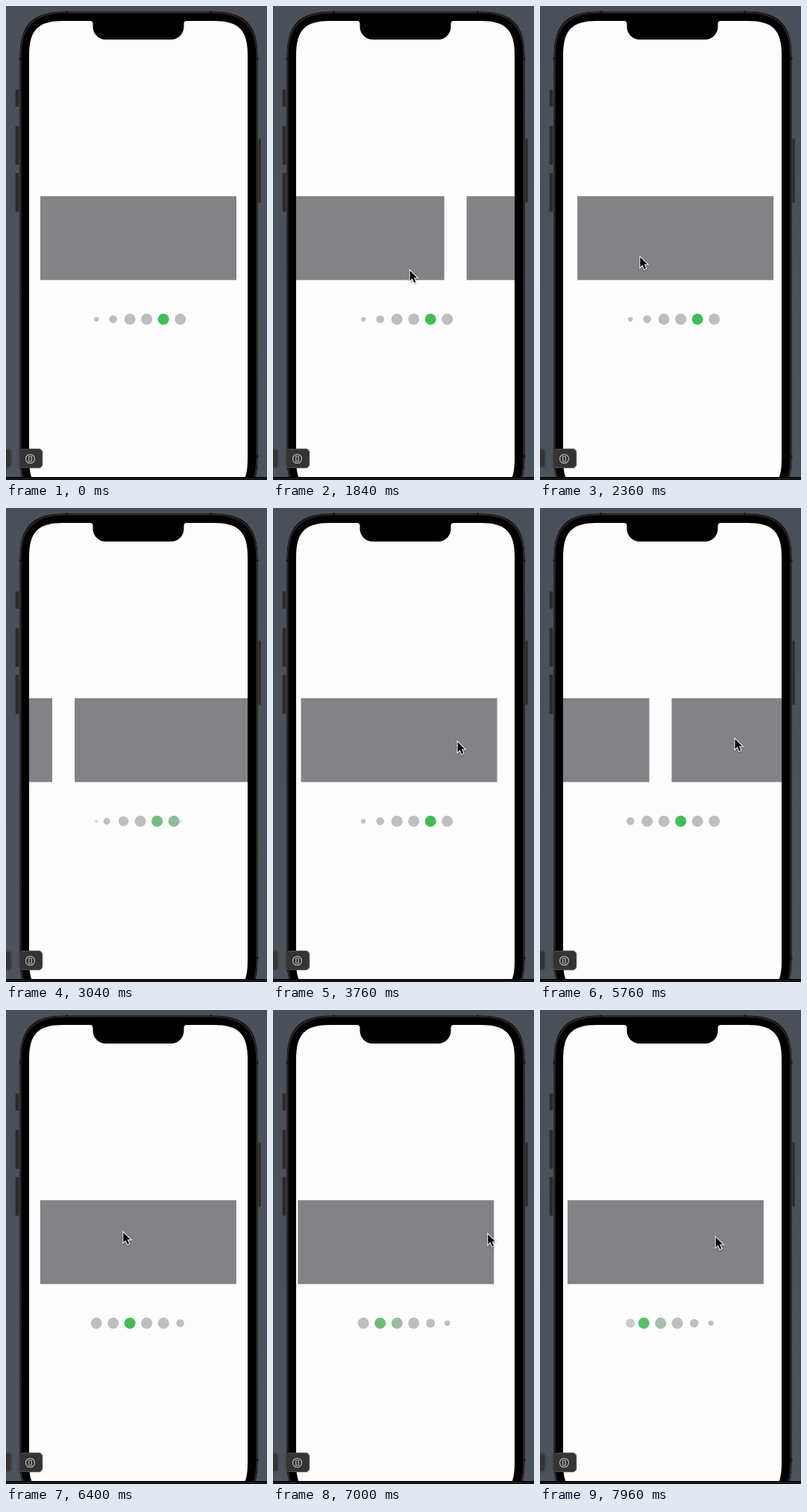
An HTML page for the animation above (8 s loop, 350 by 636 pixels).

```html
<!DOCTYPE html>
<html lang="en">
<head>
<meta charset="utf-8">
<title>Paging dots</title>
<style>
  html, body { margin: 0; width: 100%; height: 100%; overflow: hidden; background: #4b515a; }
  svg { display: block; width: 350px; height: 636px; }
</style>
</head>
<body>
<svg viewBox="0 0 350 636">
  <defs>
    <clipPath id="screen">
      <path d="M31 66C31 32 43 20 77 20H278C312 20 324 32 324 66V608C324 642 312 654 278 654H77C43 654 31 642 31 608Z"/>
    </clipPath>
    <linearGradient id="wall" x2="0" y2="1">
      <stop stop-color="#4a505a"/><stop offset="1" stop-color="#4d535c"/>
    </linearGradient>
  </defs>
  <rect width="350" height="636" fill="url(#wall)"/>

  <g fill="#29292b" stroke="#3b3c3f" stroke-width=".6">
    <rect x="12.8" y="112" width="5" height="23" rx="1"/>
    <rect x="12.8" y="161" width="5" height="52" rx="1"/>
    <rect x="12.8" y="224" width="5" height="52" rx="1"/>
    <rect x="337" y="178" width="4.6" height="86" rx="1"/>
  </g>
  <path d="M18 67C18 25 36 7 78 7H278C320 7 338 25 338 67V607C338 649 320 667 278 667H78C36 667 18 649 18 607Z" stroke="#50504f"/>
  <path d="M19.7 67C19.7 27 38 8.8 78 8.8H278C318 8.800 336.3 27 336.3 67V607C336.3 647 318 665 278 665H78C38 665 19.7 647 19.7 607Z" fill="none" stroke="#2a2a2a" stroke-width="1.8"/>
  <path d="M17.5 70.5h3M335.5 70.5h3M17.5 604h3M335.5 604h3M81.5 6.5v3M274.5 6.5v3" stroke="#161616" stroke-width="3"/>

  <g clip-path="url(#screen)">
    <rect x="31" y="20" width="293" height="616" fill="#fdfdfd"/>
    <g id="cards" fill="#838286"></g>
    <g id="dots"></g>
  </g>
  <path d="M112.500 19V20A4 4 0 0 1 116.500 24V28A17 17 0 0 0 133.500 45H221.500A17 17 0 0 0 238.500 28V24A4 4 0 0 1 242.500 20V19Z"/>

  <rect y="632" width="350" height="4" fill="#050505"/>
  <rect y="634" width="350" height=".8" fill="#303236"/>

  <g fill="#343434" stroke="#4e4f50" style="filter:drop-shadow(0 0 1px rgba(0,0,0,.4))">
    <rect x="-24" y="594.5" width="31" height="25" rx="4.5"/>
    <rect x="17.5" y="594.5" width="31" height="25" rx="4.5"/>
  </g>
  <g fill="none" stroke="#bdbdbd" stroke-width="1.1">
    <circle cx="32.5" cy="607.5" r="6"/>
    <rect x="30.7" y="604" width="3.6" height="7" rx=".8"/>
  </g>

  <path id="cursor" d="M1 2V15.600L4.100 12.600L6.600 18.200L8.800 17.200L6.400 11.600H10.600Z" stroke="#fff" stroke-width="2"
    style="paint-order:stroke;filter:drop-shadow(0 1px 1px rgba(0,0,0,.35))"/>
</svg>
<script>
const LOOP = 8000, PITCH = 293, PAGES = 10;
const DRAG = 250, FLING = 100, RETURN = 640, FADE = 350;
const SLOTS = 6, GAP = 22.5;
const GREY = [190, 190, 192], GREEN = [63, 191, 82];

const $ = id => document.getElementById(id);
const mix = (a, b, u) => a + (b - a) * u;
const clamp = (v, lo, hi) => Math.min(hi, Math.max(lo, v));
const smooth = u => u * u * (3 - 2 * u);
const easeOut = u => 1 - (1 - u) ** 2;

// The first entry is the resting state.
const swipes = [{ at: -100, dir: 1, x: 262, y: 424, page: 4, first: 0 }];

// at: release time, when the page is halfway; x, y: where the pointer grabs
function swipe(at, dir, x, y) {
  const last = swipes[swipes.length - 1], page = last.page + dir;
  // Keep one dot visible on each side of the current one
  const first = clamp(last.first, page - SLOTS + 2, page - 1);
  swipes.push({ at, dir, x, y, page, first });
}
swipe(1906, 1, 262, 353);
swipe(2893, 1, 250, 322);
swipe(3950, 1, 255, 312);
swipe(5030, -1, 158, 308);
swipe(5774, -1, 130, 308);
swipe(6780, -1, 150, 296);
swipe(7710, -1, 181, 304);
swipe(8500, -1, 146, 302);

function add(parent, tag, attrs) {
  const el = document.createElementNS('http://www.w3.org/2000/svg', tag);
  set(el, attrs);
  return parent.appendChild(el);
}
function set(el, attrs) {
  for (const k in attrs) el.setAttribute(k, attrs[k]);
}

for (let i = 0; i < PAGES; i++)
  add($('cards'), 'rect', { x: 46 + i * PITCH, y: 255.2, width: 263, height: 112.5 });
// Later dots go underneath earlier ones
const dots = [];
for (let i = PAGES - 1; i >= 0; i--) dots[i] = add($('dots'), 'circle', { cy: 420.3 });

const dragged = d => 0.5 * (1 + d / DRAG) ** 2;
const settled = (d, dir) => 1 - 0.5 * Math.exp(-d / (dir > 0 ? 127 : 90));

function scrollAt(t) {
  let pos = swipes[0].page;
  for (const { at, dir, page } of swipes.slice(1)) {
    const d = t - at;
    if (d > -DRAG) pos = page - dir + dir * (d < 0 ? dragged(d) : settled(d, dir));
  }
  return pos;
}

function dotState(i, { page, first }) {
  const slot = i - first, shown = slot >= 0 && slot < SLOTS;
  const far = clamp(Math.abs(i - page) - 2, 0, 2);
  return {
    x: 121.2 + GAP * clamp(slot, 0, SLOTS - 1),
    r: shown ? 7.5 - 2.2 * far : 0,
    alpha: +shown,
    on: +(i === page)
  };
}

function drawDots(t) {
  const n = swipes.findLastIndex(s => s.at <= t);
  const to = swipes[n], from = swipes[n - 1] || to;
  const u = n ? smooth(clamp((t - to.at) / FADE, 0, 1)) : 1;
  dots.forEach((dot, i) => {
    const a = dotState(i, from), b = dotState(i, to);
    const on = mix(a.on, b.on, u);
    set(dot, {
      cx: mix(a.x, b.x, u),
      r: mix(a.r, b.r, u),
      opacity: mix(a.alpha, b.alpha, u),
      fill: `rgb(${GREY.map((c, k) => Math.round(mix(c, GREEN[k], on)))})`
    });
  });
}

// Drag with the card, fling past the edge, then come back to the next grab
function pointerAt(t) {
  const n = swipes.findIndex(s => t < s.at + FLING);
  const prev = swipes[n - 1], next = swipes[n], d = t - next.at;
  const edge = s => s.dir > 0 ? -30 : 350;
  const pulled = u => next.x - next.dir * PITCH * u;
  if (d >= 0) return [mix(pulled(0.5), edge(next), d / FLING), next.y];
  if (d > -DRAG) return [pulled(dragged(d)), next.y];
  const left = prev.at + FLING;
  const span = Math.min(RETURN, next.at - DRAG - left);
  const u = (prev.dir > 0 ? smooth : easeOut)(clamp((t - left) / span, 0, 1));
  return [mix(edge(prev), next.x, u), mix(prev.y, next.y, u)];
}

let origin;
function frame(now) {
  origin ??= now;
  const t = (now - origin) % LOOP;
  $('cards').setAttribute('transform', `translate(${-PITCH * scrollAt(t)} 0)`);
  drawDots(t);
  $('cursor').setAttribute('transform', `translate(${pointerAt(t)})`);
  requestAnimationFrame(frame);
}
requestAnimationFrame(frame);
</script>
</body>
</html>
```
